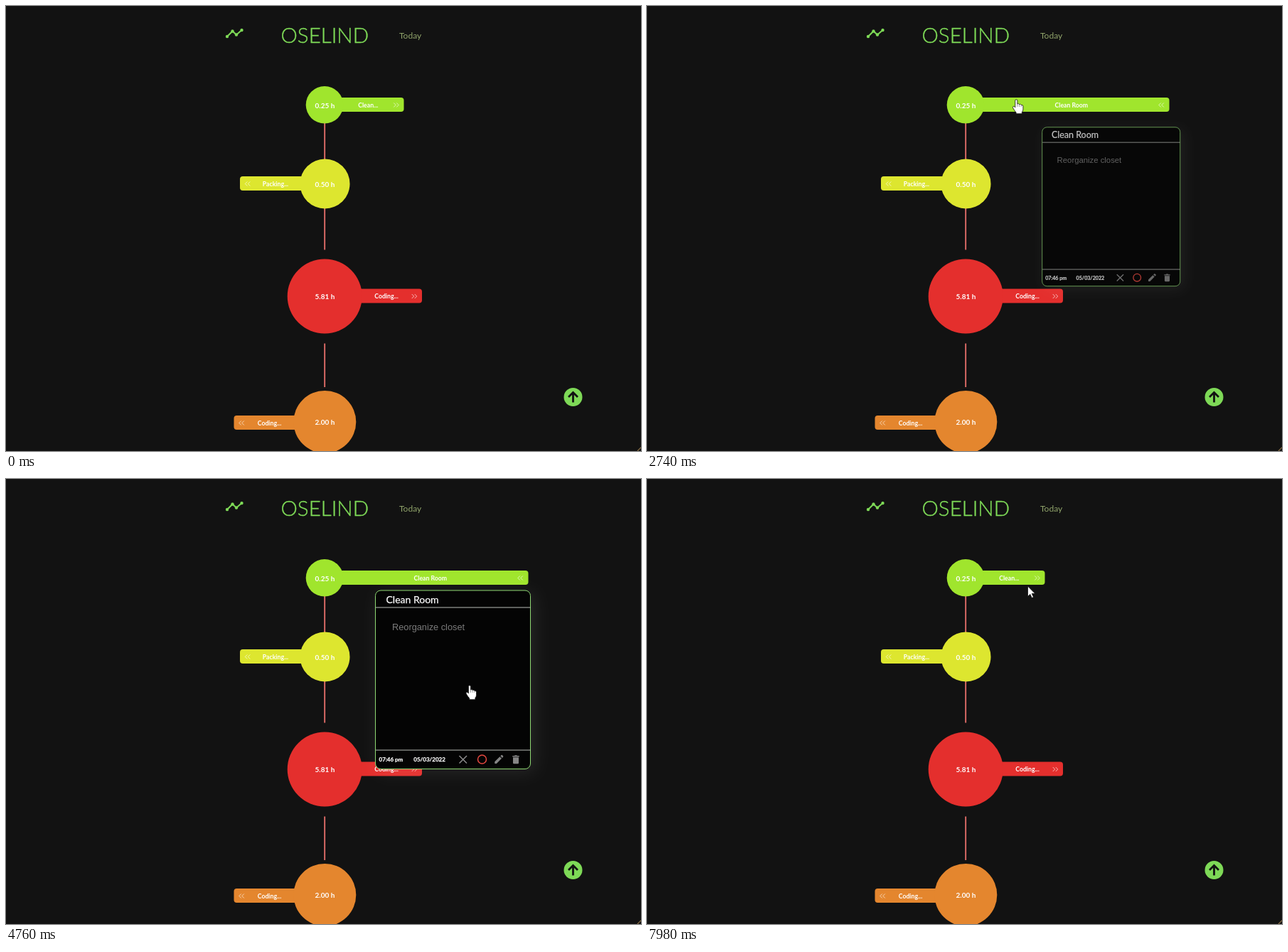
An HTML page that plays this animation: 893 px wide and 627 px high, repeating every 8 s.

```html
<!DOCTYPE html>
<html lang="en">
<head>
<meta charset="utf-8">
<title>Oselind</title>
<style>
  html, body { margin: 0; width: 100%; height: 100%; overflow: hidden; background: #121212; }
  svg { display: block; width: 100vw; height: 100vh; }
  text { font-family: Lato, sans-serif; }
  .mid { text-anchor: middle; }
  .hours { font-size: 10px; font-weight: 700; fill: #fff; }
  .label { font-size: 8.7px; font-weight: 700; fill: #fff; }
  .chev { fill: none; stroke: #fff; stroke-opacity: .65; stroke-width: 1; }
  .arial { font-family: "Liberation Sans", Arial, sans-serif; }
  .stamp { font-size: 8px; font-weight: 700; fill: #fff; stroke: #fff; stroke-width: .25px; }
</style>
</head>
<body>
<svg viewBox="0 0 893 627">
  <defs>
    <filter id="blur" x="-30%" y="-30%" width="160%" height="160%"><feGaussianBlur stdDeviation="12"/></filter>
  </defs>
  <rect width="893" height="627" fill="#121212"/>

  <!-- header -->
  <g fill="#7ed957" stroke="#7ed957">
    <path d="M311 43L318.500 35.500L324 40.500L331.500 34" fill="none" stroke-width="2"/>
    <g stroke="none">
      <circle cx="311" cy="43" r="2.200"/><circle cx="318.500" cy="35.500" r="2.200"/>
      <circle cx="324" cy="40.500" r="2.200"/><circle cx="331.500" cy="34" r="2.200"/>
    </g>
  </g>
  <text class="mid" x="448.300" y="52" font-size="29.500" font-weight="300" fill="#7ed957" stroke="#7ed957" stroke-width=".4">OSELIND</text>
  <text x="553" y="45.500" font-size="12" fill="#91a56b">Today</text>

  <path d="M448.200 160V216M448.200 284V343.500M448.200 475.500V537" stroke="#e8706c" stroke-width="1.800"/>
  <g id="items"></g>

  <!-- scroll to top -->
  <circle cx="797.500" cy="551" r="13" fill="#7ed957"/>
  <path d="M797.500 558.500V545M791 551L797.500 544.500L804 551" fill="none" stroke="#121212" stroke-width="2.800"/>
  <path d="M888 627L893 622" stroke="#8a6f45" stroke-width="1.200"/>

  <!-- detail card -->
  <g id="card">
    <rect x="523" y="160" width="221" height="254" rx="8" fill="#fff" opacity=".08" filter="url(#blur)"/>
    <rect x="519.500" y="157" width="218" height="251.500" rx="7.500" fill="#040404" stroke="#8fd873"/>
    <path d="M520 181H737.500M520 382H737.500" stroke="#b9bdb7"/>
    <text x="534.500" y="174.500" font-size="14" fill="#fff" stroke="#fff" stroke-width=".25">Clean Room</text>
    <text class="arial" x="543" y="213" font-size="12.750" fill="#7b7b7b">Reorganize closet</text>
    <text class="stamp" x="524.500" y="398.300">07:46 pm</text>
    <text class="stamp" x="573.300" y="398.300">05/03/2022</text>
    <path d="M637.500 390L648 400.500M648 390L637.500 400.500" stroke="#8c8c8c" stroke-width="1.500"/>
    <circle cx="669.500" cy="395" r="6" fill="none" stroke="#e5483f" stroke-width="1.500"/>
    <g fill="#858585">
      <path d="M687.300 401V398.300L694.400 391.200L697 393.800L689.900 401ZM695.300 390.300L696.700 389Q697.300 388.600 697.900 389.100L699.200 390.400Q699.600 391 699.100 391.600L697.900 392.900Z"/>
      <path d="M712.300 390H715L715.700 389.200H718.300L719 390H721.700V391.500H712.300ZM713 392.300H721V400Q721 401.200 719.800 401.200H714.200Q713 401.200 713 400Z"/>
    </g>
  </g>

  <g id="tip">
    <rect x="618" y="417" width="49" height="22.500" rx="3" fill="#5c5c5c"/>
    <text class="arial mid" x="642.500" y="431.700" font-size="9" fill="#fff">Minimize</text>
  </g>

  <circle id="press" r="13" fill="#f0dc00" fill-opacity=".55"/>
  <g id="cursor" fill="#fff" stroke="#111" stroke-width=".8" stroke-linejoin="round">
    <path id="arrow" d="M0 0V14.500L3.400 11.400L5.700 16.500L8 15.500L5.800 10.500H10.300Z"/>
    <g id="hand" transform="translate(-.5 -1)">
      <path d="M-1.700 1.300Q-1.700 -.2 -.2 -.2T1.400 1.300V6Q3.200 5 4.100 6.600Q6 5.800 6.700 7.400Q9.300 6.900 9.400 9.500V13.500Q9.300 16 7.800 17.500V19.800H-.4V18Q-2.700 15.500 -4.500 12.300Q-5.700 10 -4.400 9.400Q-3.200 9 -1.700 11Z"/>
      <path d="M1.400 6V10M4.100 6.600V10M6.700 7.400V10" fill="none" stroke="#555" stroke-width=".6"/>
    </g>
  </g>
</svg>
<script>
const LOOP = 8000;
const $ = id => document.getElementById(id);
const clamp = v => Math.max(0, Math.min(1, v));
const span = (t, from, to) => clamp((t - from) / (to - from));
const smooth = p => p * p * (3 - 2 * p);
const mix = (a, b, p) => a + (b - a) * p;

// dir 1: double chevron pointing right, -1: left
const chevron = (x, y, dir) => [-3.3, 0.7]
  .map(o => `M${x + dir * o} ${y - 3}l${dir * 3} 3l${-dir * 3} 3`).join('');

// cx, cy, r, hours, colour, label, outer end of the bar, bar top
const items = [
  [448, 139.3, 26.3, '0.25 h', '#a0e52d', 'Clean...', 559.5, 129],
  [448.5, 250.5, 35, '0.50 h', '#dde62f', 'Packing...', 329, 240],
  [448.2, 409, 52.5, '5.81 h', '#e42f2d', 'Coding...', 585, 398.5],
  [448.3, 586, 44, '2.00 h', '#e4862e', 'Coding...', 320.5, 577]
];
$('items').innerHTML = items.map(([cx, cy, r, hours, color, label, end, top], i) => {
  const dir = end > cx ? 1 : -1;
  const x = Math.min(cx, end), mid = end - dir * 50;
  return `<g id="item${i}">
    <rect class="bar" x="${x}" y="${top}" width="${Math.abs(end - cx)}" height="20" rx="4" fill="${color}"/>
    <text class="label mid" x="${mid}" y="${top + 13.8}">${label}</text>
    <path class="chev" d="${chevron(end - dir * 11, top + 10.5, dir)}"/>
    <circle cx="${cx}" cy="${cy}" r="${r}" fill="${color}"/>
    <text class="hours mid" x="448.500" y="${cy + 4.4}">${hours}</text></g>`;
}).join('');

const part = sel => document.querySelector('#item0 ' + sel);
const bar = part('.bar'), label = part('.label'), chev = part('.chev');

// pointer path: time, x, y
const path = [
  [410, 716, 471], [520, 645, 167], [870, 645, 167], [1190, 520, 133],
  [3080, 520, 133], [3710, 524, 160], [3780, 541, 172], [4310, 600, 180],
  [4560, 600, 180], [4760, 652.5, 291.5], [4860, 661, 340], [4980, 653, 380],
  [5100, 645.5, 392], [7330, 645.5, 392], [7980, 535.5, 151]
];
const eased = new Set([870, 3080, 3780, 7330]);

function pointer(t) {
  let i = 0;
  while (i < path.length - 2 && t >= path[i + 1][0]) i++;
  const [t0, x0, y0] = path[i], [t1, x1, y1] = path[i + 1];
  let p = span(t, t0, t1);
  if (eased.has(t0)) p = smooth(p);
  return [mix(x0, x1, p), mix(y0, y1, p)];
}

const show = (id, on) => $(id).setAttribute('visibility', on ? 'visible' : 'hidden');

function drawBar(t) {
  const open = t >= 2090 && t < 6330;
  const p = open ? smooth(span(t, 2090, 2560)) : t < 2090 ? 0 : 1 - smooth(span(t, 6330, 6790));
  const end = mix(559.5, 734.5, p);
  bar.setAttribute('width', end - 448);
  label.setAttribute('x', (473 + end) / 2 - 7);
  label.textContent = open ? 'Clean Room' : 'Clean...';
  chev.setAttribute('d', chevron(end - 11, 139.5, open ? -1 : 1));
}

function drawCard(t) {
  const p = smooth(span(t, 2130, 3110));
  const fade = 1 - span(t, 6330, 6500);
  const s = mix(0.655, 1, p);
  const card = $('card');
  card.setAttribute('opacity', clamp(p * 1.1) * fade);
  card.setAttribute('transform',
    `translate(${628.5 + 76 * (1 - p)} 282.7) scale(${s}) translate(-628.5 -282.7)`);
  $('tip').setAttribute('opacity', span(t, 5100, 5300) * (1 - span(t, 6400, 6600)));
}

function drawPointer(t) {
  const [x, y] = pointer(t);
  const overBar = x < 559 && y > 129 && y < 149 && t < 6330;
  const overCard = t > 3000 && t < 6400 && y >= 157;
  const hand = overBar || overCard;
  $('cursor').setAttribute('transform', `translate(${x} ${y})`);
  show('hand', t >= 410 && hand);
  show('arrow', t >= 410 && !hand);
  const press = $('press');
  press.setAttribute('cx', x);
  press.setAttribute('cy', y - 0.5);
  show('press', (t >= 1930 && t < 2090) || (t >= 6250 && t < 6330));
}

const start = performance.now();
function frame(now) {
  const t = Math.max(0, now - start) % LOOP;
  drawBar(t);
  drawCard(t);
  drawPointer(t);
  requestAnimationFrame(frame);
}
frame(start);
</script>
</body>
</html>
```
